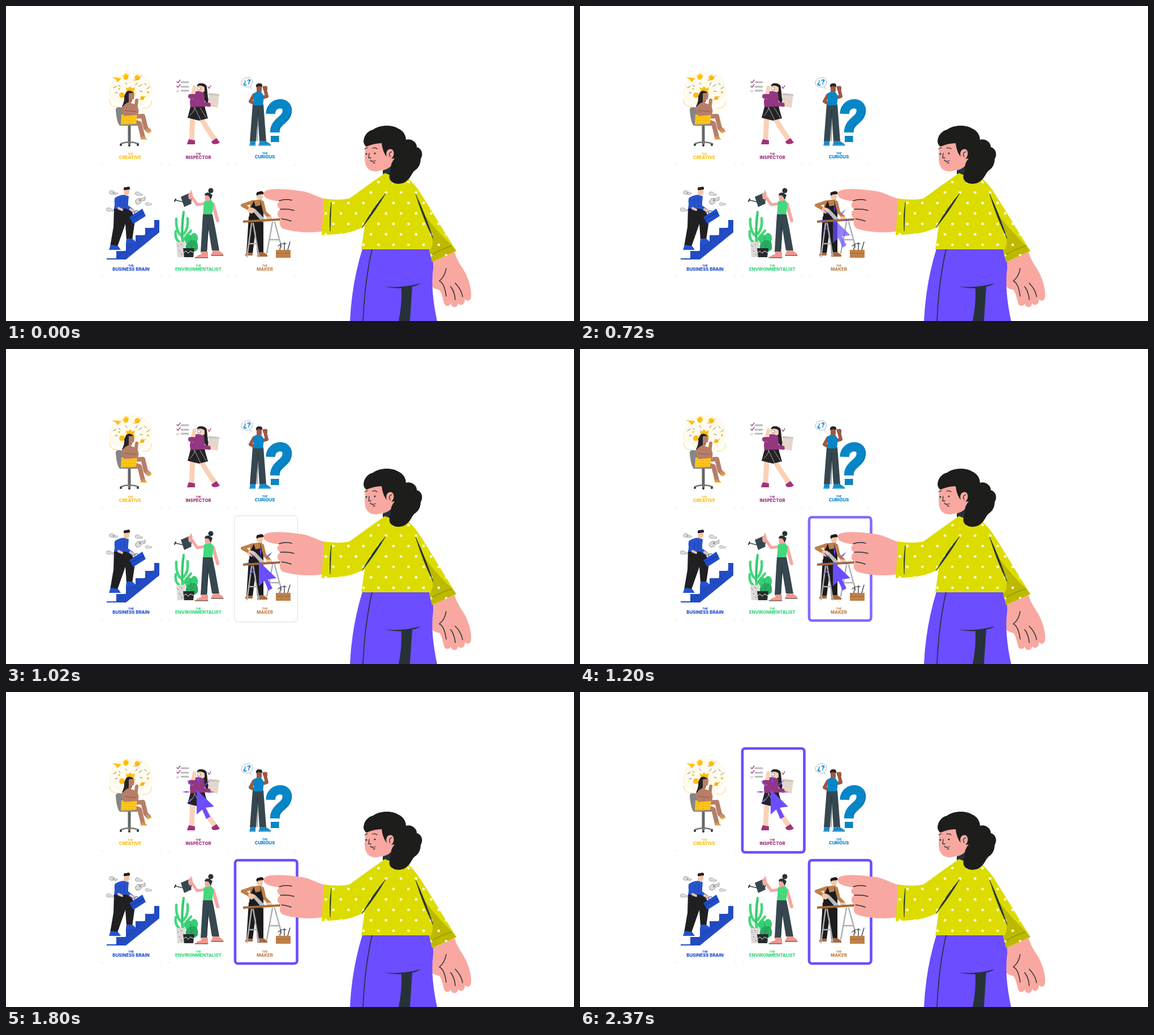
Write an HTML page that moves like this. It is 1004 px wide and 558 px high and loops after 2820 ms.

```html
<!DOCTYPE html>
<html lang="en">
<head>
<meta charset="utf-8">
<style>
html, body { margin: 0; height: 100%; overflow: hidden; background: #fff; }
svg { display: block; width: 100%; height: 100%; }
text { font-family: Inter, sans-serif; font-weight: 800; text-anchor: middle; }
.l { fill: none; stroke-linecap: round; stroke-linejoin: round; }
.d { stroke: #263238; }
</style>
</head>
<body>
<svg viewBox="0 0 1004 558" preserveAspectRatio="none">
  <defs>
    <pattern id="dots" x="631.8" y="321.2" width="26.6" height="37" patternUnits="userSpaceOnUse">
      <circle cx="13.3" cy="9.2" r="2.3" fill="#fff"/>
      <circle cx="0" cy="27.7" r="2.3" fill="#fff"/><circle cx="26.6" cy="27.7" r="2.3" fill="#fff"/>
    </pattern>
    <pattern id="spots" width="5" height="5" patternUnits="userSpaceOnUse"><circle cx="2.5" cy="2.5" r=".6" fill="#a87500"/></pattern>
    <path id="shirt" d="M670 296Q684 303 708 303Q722 314 735 335L796 434Q774 445 753 453L748 431H628L634 390Q610 403 586 404L558 406L562 341Q589 345 607 341Q638 318 670 296Z"/>
    <path id="bill" d="M-9 0Q-4-5 1-2T10-2L8 4Q4 2 0 5T-9 5Z" fill="#dcdcdc" stroke="#666" stroke-width=".6"/>
    <path id="ray" d="M13 0L21-1.3L29 0L21 1.3Z"/>
  </defs>

  <g id="cards"></g>

  <!-- Creative -->
  <g>
    <path d="M187 166C176 147 191 129 204 123C226 113 252 121 256 141C261 158 248 174 226 181Z" fill="#fffbee" stroke="#fff2cb"/>
    <path d="M183 166q2 14 14 12M241 181q16 2 16-13" class="l" stroke="#ffe9ad" stroke-width="2"/>
    <g fill="#ffbd12">
      <path d="M187 126L204 128L197 135L194 130Z"/>
      <path d="M206 123l3 1v-5l2 3 2-4 1 4 3 0-1 6q-3 4-7 2Z"/>
      <circle cx="232" cy="127" r="4.7"/><circle cx="205" cy="158" r="5"/>
      <circle cx="241" cy="163" r="3.5"/>
      <path d="M213 151l-1-7 4 2 3-4 4 4 5-2-2 8 3 5-8-2-9 1Z"/>
      <circle cx="251" cy="153" r="2"/><circle cx="200" cy="147" r="1.7"/>
    </g>
    <path d="M225 131Q231 134 240 123M236 166l11-6" class="l" stroke="#e79d00"/>
    <path d="M190 145l5-3M199 140l3 3M235 143l5-4M245 137l3 3M249 147l5-4M193 154l4-1M237 151l4 1M229 140l3-4M211 136l3 3" class="l" stroke="#6b654f" stroke-width=".9"/>
    <path d="M218 212V243" class="l" stroke="#666" stroke-width="5"/>
    <path d="M203 244Q218 238 234 244M218 242v4" class="l" stroke="#777" stroke-width="2.5"/>
    <circle cx="203" cy="246" r="2" fill="#333"/><circle cx="233" cy="246" r="2" fill="#333"/><circle cx="218" cy="247" r="2" fill="#333"/>
    <path d="M194 185Q193 179 200 179L211 181L217 208H237V212H201Q196 207 194 185Z" fill="#858585"/>
    <path d="M225 196L242 195 247 216 252 221M222 203L236 208 242 232" class="l" stroke="#b77e68" stroke-width="8"/>
    <path d="M204 192L232 191L230 209L203 210Z" fill="#ffc51b"/><path d="M204 192L232 191L230 209L203 210Z" fill="url(#spots)"/>
    <path d="M212 153Q217 147 225 153L222 169L213 181L205 178Q210 168 209 160Z" fill="#252323"/>
    <path d="M217 155Q225 152 227 158L226 165L221 167V172L230 175Q237 183 233 193L209 195L204 183Q207 174 217 170Z" fill="#b77e68"/>
    <path d="M207 181L229 183 231 167" class="l" stroke="#b77e68" stroke-width="6"/>
    <path d="M209 185L230 187" class="l" stroke="#875342" stroke-width=".8"/>
    <path d="M237 231l8 0 4 5-10 0ZM247 217l8 0 2 5-8 2Z" fill="#cf9268"/>
    <path d="M238 236h11M249 224l8-2" class="l" stroke="#ffbd12" stroke-width="1.5"/>
  </g>

  <!-- Inspector -->
  <g>
    <path d="M310 135H322M310 143H322M310 150H322" class="l" stroke="#b8b8bb" stroke-width="3"/>
    <path d="M302 134l2 2 4-5M302 142l2 2 4-5M357 143l2 3 3-5" class="l" stroke="#9c317f" stroke-width="1.3"/>
    <path d="M301 149h5v4h-5Z" fill="#dedee0"/>
    <path d="M330 197L328 239M344 197Q354 216 370 238" class="l" stroke="#f9d1b8" stroke-width="9"/>
    <path d="M323 236L334 238V245H320Q321 241 323 236ZM363 240L372 234L378 242Q372 246 365 244Z" fill="#a0327d"/>
    <path d="M345 140Q354 136 355 144L357 163Q362 170 357 177L347 160Z" fill="#242326"/>
    <path d="M339 142Q347 138 351 143V151Q344 157 339 151Z" fill="#f9d1b8"/>
    <path d="M328 153Q339 148 350 154L352 181H326L325 170Z" fill="#943681"/>
    <path d="M330 161L333 144" class="l" stroke="#f9d1b8" stroke-width="7"/>
    <path d="M326 160L334 160" class="l" stroke="#943681" stroke-width="8"/>
    <path d="M337 142Q339 136 346 137Q354 136 354 147Q349 141 343 141Z" fill="#242326"/>
    <circle cx="341" cy="146" r="3" fill="#fff" stroke="#777" stroke-width=".8"/>
    <path d="M326 179L351 178L357 199L341 203L321 198Z" fill="#242326"/>
    <path d="M325 194Q335 184 333 179L344 202M343 180L354 198" class="l" stroke="#e9dfe9" stroke-width=".7"/>
    <path d="M359 155L377 157L374 180L356 177Z" fill="#e2d7ce"/>
    <path d="M358 154L377 156V159L357 158Z" fill="#cfc5bd"/>
    <path d="M347 162L346 173 359 175" class="l" stroke="#943681" stroke-width="7"/>
    <path d="M361 170l9 1 1 4-9 3Z" fill="#f9d1b8"/>
  </g>

  <!-- Curious -->
  <g>
    <path d="M432 143Q424 145 418 141C413 136 418 129 423 128Q431 124 435 131Q437 137 432 143L434 147" class="l" stroke="#8b9aa2" stroke-width=".7"/>
    <text x="426" y="138.500" font-size="12" fill="#0a86c9">¿?</text>
    <path d="M467.500 191C468 170 497 167 497 185C497 203 475 203 475 224" class="l" stroke="#0786c7" stroke-width="16.500" style="stroke-linecap:butt"/>
    <path d="M468 230H482V241H468Z" fill="#0786c7"/>
    <path d="M504 180Q508 198 487 207Q483 211 483 224M482 230V241" class="l" stroke="#086ca5"/>
    <path d="M436 174L455 174L460 240H448L445 196L442 240H431Z" fill="#37474f"/>
    <path d="M445 184L444 239" class="l" stroke="#1d2a30" stroke-width=".8"/>
    <path d="M432 239H441V248H430ZM449 239H459L468 245V248H446Z" fill="#188bc9"/>
    <path d="M430 247H441M447 247H467" class="l" stroke="#d9edf7" stroke-width=".8"/>
    <path d="M438 158L432 169 440 173M454 162L461 160 458 148" class="l" stroke="#9b5946" stroke-width="6"/>
    <path d="M443 141h9v10l-3 4-6-3Z" fill="#9b5946"/>
    <path d="M442 144Q441 137 447 137Q454 136 453 143L446 142Z" fill="#2a2526"/>
    <path d="M437 155L443 152L452 153L456 160L454 176L438 176Z" fill="#0786c7"/>
    <path d="M453 143q6-3 9 0v6h-7Z" fill="#9b5946"/>
  </g>

  <!-- Business -->
  <g>
    <path d="M178 449V447H195V434H212V420H229V406H246V393H262V379H271V401L212 449Z" fill="#234cc3"/>
    <path d="M195 447L271 384" class="l" stroke="#1b3ca2" stroke-width=".7"/>
    <use href="#bill" transform="translate(190 330)rotate(20)scale(.75)"/><use href="#bill" transform="translate(235 332)rotate(20)scale(.7)"/>
    <use href="#bill" transform="translate(237 343)rotate(-20)"/><use href="#bill" transform="translate(184 360)rotate(15)scale(.7)"/>
    <use href="#bill" transform="translate(252 350)rotate(10)scale(.6)"/>
    <circle cx="237" cy="344" r="2" fill="#999"/><circle cx="190" cy="331" r="1.500" fill="#999"/>
    <path d="M191 358L215 357Q228 369 228 380L223 415H213L211 386L197 426H184L190 391Z" fill="#202022"/>
    <path d="M185 423L198 425L203 432H182ZM213 412H223L229 417V420H212Z" fill="#2552d2"/>
    <path d="M194 339Q207 331 217 337L215 359L191 359Z" fill="#2853cd"/>
    <path d="M195 342Q193 351 200 359M213 342L213 355 224 363" class="l" stroke="#2853cd" stroke-width="6"/>
    <path d="M209 324h9v8l-4 5-6-4Z" fill="#f4c4a8"/>
    <path d="M208 326Q207 320 213 321Q220 318 219 325L211 326Z" fill="#202022"/>
    <path d="M199 358l6 3M220 360l8 5" class="l" stroke="#f4c4a8" stroke-width="4"/>
    <path d="M218 374L241 359L247 372L225 386Z" fill="#204dc7"/>
    <path d="M227 368Q225 361 233 363M220 378L244 366" class="l" stroke="#12338d"/>
    <path d="M202 342v12M209 340v15" class="l" stroke="#153b9f" stroke-width=".6"/>
  </g>

  <!-- Environmentalist -->
  <g>
    <path d="M309 338L323 332L328 350L315 356Z" fill="#37474f"/>
    <path d="M313 347L300 344M323 336Q330 337 327 346" class="l" stroke="#37474f" stroke-width="1.5"/>
    <path d="M300 342L298 346" class="l d" stroke-width="2"/>
    <path d="M329 339L338 352 351 350" class="l" stroke="#f4a8a0" stroke-width="5"/>
    <path d="M322 335q1-5 4-5v-5q3 3 4 9l-1 7-6 1Z" fill="#f4a8a0"/>
    <path d="M366 351L374 380" class="l" stroke="#f4a8a0" stroke-width="6"/>
    <circle cx="362" cy="327" r="4.5" fill="#273238"/>
    <path d="M351 334h12v9l-4 5-7-3Z" fill="#f4a8a0"/>
    <path d="M351 335Q352 329 360 331L365 335L362 343L358 336Z" fill="#273238"/>
    <path d="M350 346L363 344L367 350L364 373H348Z" fill="#43d97c"/>
    <path d="M348 369H365L370 394L377 433H364L358 396L355 436H344Z" fill="#37474f"/>
    <path d="M357 386L355 433" class="l" stroke="#1e2b31" stroke-width=".8"/>
    <path d="M345 435H357V446H334Q339 440 345 440ZM366 433H376L384 439V442H362Z" fill="#f2978e"/>
    <path d="M334 446H357M363 442H384" class="l d"/>
    <path d="M312 419Q310 388 314 365M310 407Q300 399 301 377M314 404Q323 394 321 376M306 418Q298 412 300 399M312 417Q318 407 327 398" class="l" stroke="#43d87c" stroke-width="4.500"/>
    <path d="M315 412Q319 402 327 406Q333 398 338 406Q343 417 328 428Q318 425 315 412Z" fill="#37ce73"/>
    <path d="M319 433Q314 421 327 415Q341 412 339 431Q330 440 319 433Z" fill="#2cab61"/>
    <path d="M314 369L311 412M326 409L328 432M332 417L325 434" class="l" stroke="#1d8f4e" stroke-width=".7"/>
    <path d="M301 418H317L315 445H303Z" fill="#ded9d8"/>
    <path d="M303 424l2 2M309 422l2 2M306 433l2 2M310 439l1 2" class="l" stroke="#555" stroke-width=".8"/>
    <path d="M313 429H333L331 445H315Z" fill="#282b2d"/>
    <path d="M314 437l4-3 4 4 4-4 6 3" class="l" stroke="#f4f4f4"/>
  </g>

  <!-- Maker -->
  <g>
    <path d="M429 373L455 368L455 438H444L441 398L436 438H425Z" fill="#1d1c1d"/>
    <path d="M425 437H436V442H422ZM445 436H455L462 441V444H444Z" fill="#a76a3b"/>
    <path d="M432 345L452 342L456 365L430 370Z" fill="#bd804c"/>
    <path d="M436 347L418 353 431 360M453 348L457 365 465 373" class="l" stroke="#bd804c" stroke-width="6"/>
    <path d="M438 345L441 355L450 353L449 343L455 367L454 378L429 379L432 358Z" fill="#1d1c1d"/>
    <path d="M443 331h11v9l-4 4-7-4Z" fill="#f2c7a6"/>
    <path d="M443 336Q441 329 447 329Q455 326 456 333L447 334Z" fill="#1d1c1d"/>
    <path d="M434 361L440 359L460 380L453 383Z" fill="#b9bdc1"/>
    <path d="M429 356l9 2 2 6-6 4-7-4Z" fill="#f2c7a6"/>
    <path d="M459 373l10 0 2 5-10 0Z" fill="#f2c7a6"/>
    <path d="M434 385L426 444M437 385L447 444M471 383L461 438M475 383L487 427M430 421H443M465 414H483" class="l" stroke="#aeb0b3" stroke-width="2.500"/>
    <path d="M419 380L485 376V380L419 384Z" fill="#a76a36"/>
    <path d="M484 432L486 421M492 433V419M498 432L502 418M481 425l6-4M489 421h6" class="l" stroke="#4b5053" stroke-width="1.500"/>
    <path d="M477 432H503V446H477Z" fill="#bf8148"/>
    <path d="M478 438H502" class="l" stroke="#91602e" stroke-width=".8"/>
  </g>

  <g class="l">
    <rect class="hover" x="403.5" y="295.5" width="112" height="188" rx="5" stroke="#dedede"/>
    <rect class="picked" x="405" y="298" width="109.5" height="183" rx="5" stroke="#6c4dff" stroke-width="4.6"/>
    <rect class="hover" x="285.5" y="97.5" width="112" height="188" rx="5" stroke="#dedede"/>
    <rect class="picked" x="287" y="100" width="109.5" height="184" rx="5" stroke="#6c4dff" stroke-width="4.6"/>
  </g>

  <!-- Pointing woman -->
  <g>
    <path d="M754 450L793 436C797 452 808 464 813 475C820 490 823 505 822 516C820 524 814 523 811 519C812 529 803 533 799 526C799 535 788 536 786 527C784 533 775 533 774 525C771 514 770 508 766 503Q756 501 752 496Z" fill="#f8a8a0"/>
    <path d="M778 465Q776 479 766 487Q775 491 778 514M786 497Q793 506 794 520M794 491Q805 502 807 515" class="l d" stroke-width="1.5"/>
    <path d="M630 430H748Q756 441 755 465Q750 502 762 558H608Q611 492 630 430Z" fill="#6c4dff"/>
    <path d="M647 431Q634 488 631 558" class="l d" stroke-width="1.6"/>
    <path d="M669 497Q702 500 733 491Q726 496 718 497L714 558H694Q700 529 699 500Q683 500 669 497Z" fill="#263238"/>
    <path d="M564 342C546 337 535 328 515 327C495 324 470 323 460 327C452 331 455 338 462 341Q470 345 484 346C477 350 479 357 485 360C477 365 479 375 487 377C481 383 483 394 495 396Q528 404 562 399Z" fill="#f8a8a0"/>
    <path d="M483 345Q494 341 505 344M485 360Q498 359 509 362M487 377Q496 378 504 381" class="l d" stroke-width="1.5"/>
    <path d="M636 244Q632 270 636 282Q641 294 655 293L668 290 666 298 691 309V240Z" fill="#f8a8a0"/>
    <path d="M666 291Q676 289 682 282L684 306Q674 302 666 297Z" fill="#263238"/>
    <use href="#shirt" fill="#dcdc00"/>
    <path d="M733 361Q762 400 788 424L796 434L753 453L748 434Q758 424 752 405Z" fill="#bcb900"/>
    <use href="#shirt" fill="url(#dots)"/>
    <path d="M671 332Q650 356 629 393Q654 362 671 332ZM724 333Q741 369 755 412Q737 376 724 333ZM575 348Q571 372 573 399Q574 373 575 348Z" fill="#263238" stroke="#263238" stroke-width=".6"/>
    <path d="M752 441Q770 430 788 425" class="l" stroke="#858400"/>
    <path d="M632 241C632 229 640 221 649 219C660 210 683 210 693 217C701 220 707 228 707 237C716 234 727 242 726 250C735 252 738 263 733 271C733 281 728 288 723 291C717 296 715 305 709 309C702 317 684 317 679 308C675 300 681 294 680 288Q680 278 687 270L676 271Q666 261 664 243Q651 243 637 249Q633 246 632 241Z" fill="#1d1d1b"/>
    <path d="M673 268C670 257 676 252 682 254C688 257 686 270 678 272Q674 273 673 268Z" fill="#f8a8a0"/>
    <path d="M682 258Q675 260 679 267M634 253L639 251M648 252Q652 250 656 253M642 261L641 269 645 269M644 273Q647 277 653 274M649 278l3 0" class="l d" stroke-width="1.3"/>
    <circle cx="637" cy="262" r="1.5" fill="#263238"/><circle cx="652" cy="261" r="1.5" fill="#263238"/>
  </g>

  <g id="cursor" fill="#6c4dff">
    <path d="M0 0V44L10 35L17 52L24 48L16 32L31 30Z"/>
    <g id="rays" transform="translate(3 4)"></g>
  </g>
</svg>
<script>
const $ = id => document.getElementById(id);
const titles = [
  ["CREATIVE", "#ffbd12"], ["INSPECTOR", "#a0327d"], ["CURIOUS", "#0a84c8"],
  ["BUSINESS BRAIN", "#1f4bcf"], ["ENVIRONMENTALIST", "#30d67a"], ["MAKER", "#c0824a"]
];
$("cards").innerHTML = titles.map(([title, color], i) => {
  const x = 168 + i % 3 * 118.7, y = i < 3 ? 101 : 299, cx = [219.5, 340, 457.5][i % 3] + (i === 3 ? 1.5 : 0);
  const base = y + 170 - (i === 2 ? .8 : 0);
  return `<path class="l" stroke="#e5e5e5" stroke-width=".8" d="M${x} ${y + 178}q0 4 4 4M${x + 103} ${y + 182}q4 0 4-4"/>
    <g fill="${color}"><text x="${cx}" y="${base - 7}" font-size="4.7">THE</text>
    <text x="${cx}" y="${base}" font-size="7.8">${title}</text></g>`;
}).join("");
$("rays").innerHTML = [135, 180, 225, 270, 315, 360]
  .map(a => `<use href="#ray" transform="rotate(${a})"/>`).join("");

const hovers = document.querySelectorAll(".hover"), picks = document.querySelectorAll(".picked");
const ramp = (t, from, to) => Math.min(1, Math.max(0, (t - from) / (to - from)));
const ease = k => k * k * (3 - 2 * k);

function draw() {
  const t = Math.floor(performance.now() % 2820 / 30) * 30;
  const move = ease(ramp(t, 1230, 1587));
  $("cursor").setAttribute("transform", `translate(${447 - 110 * move} ${376 - 203 * move})`);
  $("cursor").setAttribute("opacity", ramp(t, 570, 780));
  [960, 2070].forEach((start, i) => {
    const picked = ramp(t, start + 90, start + 270);
    hovers[i].setAttribute("opacity", ramp(t, start, start + 60) * (1 - picked));
    picks[i].setAttribute("opacity", picked);
  });
  requestAnimationFrame(draw);
}
draw();
</script>
</body>
</html>
```
